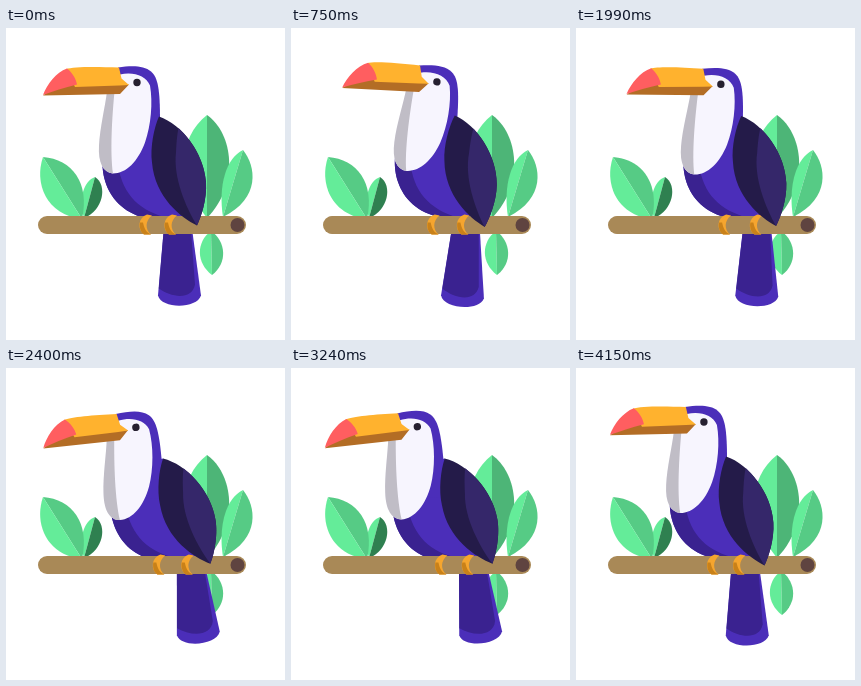
Recreate the animation shown at these times as an HTML page. Size 279 px wide and 312 px high, loop 4180 ms.

```html
<!DOCTYPE html>
<html lang="en">
<head>
<meta charset="utf-8">
<title>Toucan on a branch</title>
<style>
  html, body { margin: 0; width: 100%; height: 100%; overflow: hidden; background: #fff; }
  svg { display: block; width: 279px; height: 312px; }
  .leaf { fill: #64ec99; }
  .leaf-shade { fill: #56cb85; }
  .leaf-deep { fill: #4db577; }
  .blue { fill: #4b2eb9; }
  .indigo { fill: #3a2290; }
  .night { fill: #241b49; }
  .plum { fill: #35276a; }
</style>
</head>
<body>
<svg viewBox="0 0 279 312">
  <defs>
    <g id="foot">
      <path fill="#f5a52e" d="M8 0C-1 3-2 15 5 20L12 20C6 15 6 6 13 1Z"/>
      <path fill="#c98119" d="M1 8C0 13 2 18 5 20L12 20C7 18 5 13 4 8Z"/>
    </g>
  </defs>

  <g id="leaves">
    <path class="leaf" d="M201 87C172 110 170 152 201 190Z"/>
    <path class="leaf-deep" d="M201 87C227 105 234 156 201 190Z"/>
    <path class="leaf" d="M237 122C220 130 212 158 217 189Z"/>
    <path class="leaf-shade" d="M237 122C250 138 255 170 217 189Z"/>
    <path class="leaf" d="M205 203C190 214 190 235 206 247Z"/>
    <path class="leaf-shade" d="M205 203C220 213 222 235 206 247Z"/>
    <path class="leaf" d="M89 149C78 153 72 170 78 190Z"/>
    <path fill="#2f8050" d="M89 149C102 157 97 183 78 190Z"/>
    <path class="leaf-shade" d="M37 129C66 131 84 155 76 191Z"/>
    <path class="leaf" d="M37 129C28 155 40 187 76 191Z"/>
  </g>

  <g id="tail">
    <path class="blue" d="M158.800 190L152 268C155 281.500 191 281.500 195 268L184.500 190Z"/>
    <path class="indigo" d="M158.800 190L152.800 261C165 270 186 273 189 257L184 190Z"/>
  </g>

  <g id="body">
    <path class="blue" d="M100 118C91 137 97 186 148 192L188 196L180 120L153 89L115 95Z"/>
    <path class="indigo" d="M100 118C91 137 97 186 148 192L164 191C134 184 117 168 112 138Z"/>
  </g>

  <rect x="32" y="188" width="208" height="18" rx="9" fill="#a98957"/>
  <circle cx="231.5" cy="197" r="7" fill="#5f4440"/>

  <use id="footL" href="#foot"/>
  <use id="footR" href="#foot"/>

  <g id="head">
    <path class="blue" d="M112 40C126 38 138 38 145 44C152 50 154 62 154 92L148 128L112 125Z"/>
    <path fill="#f7f5fe" d="M114 47C127 44 140 48 144 58C147 75 145 98 139 115C132 134 120 146 107 146C97 145 92 135 93 118C94 100 99 80 101 64Z"/>
    <path fill="#c0bdc6" d="M101 64L108.500 64C106 90 104 125 107 146C97 145 92 135 93 118C94 100 99 80 101 64Z"/>
    <path fill="#b36d25" d="M37 68C50 58 62 56 73 57L123 57L114 66.500Z"/>
    <path fill="#ffb22e" d="M60 41.500C67 39 90 39 113 40L115.500 51L123 57.500L113 58L69 59.500Z"/>
    <path fill="#ff5e60" d="M37 67.500C41 57 50 45 61 41C66 45 70 51 71 57C58 60 47 64 37 67.500Z"/>
    <circle cx="131" cy="55" r="3.700" fill="#262030"/>
  </g>

  <g id="wing">
    <path class="night" d="M153 89C176 97 198 125 200 155C201 172 195 190 191 198C175 190 149 170 146 135C144 120 148 100 153 89Z"/>
    <path class="plum" d="M172.500 100.500C189 116 199 137 200 155C201 172 195 190 191 198C180 180 167 150 170 125C170.500 115 171 108 172.500 100.500Z"/>
  </g>
</svg>
<script>
const LOOP = 4180;

// Rest, lean back, lean forward, hold, return.
const keys = [
  { t: 0,    lean: 0,    shift: 0,   stance: 25 },
  { t: 1450, lean: 8,    shift: 5,   stance: 34 },
  { t: 2600, lean: -6,   shift: 14,  stance: 28 },
  { t: 2900, lean: -6.2, shift: 13,  stance: 27 },
  { t: LOOP, lean: -0.2, shift: -2.5, stance: 26 }
];

const ease = u => (1 - Math.cos(Math.PI * u)) / 2;

function poseAt(t) {
  const i = keys.findIndex(k => k.t > t);
  const a = keys[i - 1], b = keys[i];
  const u = ease((t - a.t) / (b.t - a.t));
  const mix = name => a[name] + (b[name] - a[name]) * u;
  return { lean: mix("lean"), shift: mix("shift"), stance: mix("stance") };
}

// Moves a part by dx, dy and turns it about its pivot.
function place(id, dx, dy, angle = 0, px = 0, py = 0) {
  document.getElementById(id).setAttribute("transform",
    `translate(${dx} ${dy}) rotate(${angle} ${px} ${py})`);
}

function draw(t) {
  const { lean, shift, stance } = poseAt(t);
  const sink = 0.35 * lean - 0.5;
  place("tail", shift, sink, lean, 172, 205);
  place("body", shift, sink, lean, 191, 198);
  place("wing", shift, sink, lean, 191, 198);
  place("head", shift + 2.9 * lean, 0.25 * shift - 0.3 * lean - 0.5, lean, 131, 55);
  place("footL", 133 + shift, 186.5);
  place("footR", 133 + shift + stance, 186.5);
}

const start = performance.now();
function tick() {
  draw((performance.now() - start) % LOOP);
  requestAnimationFrame(tick);
}
tick();
</script>
</body>
</html>
```
